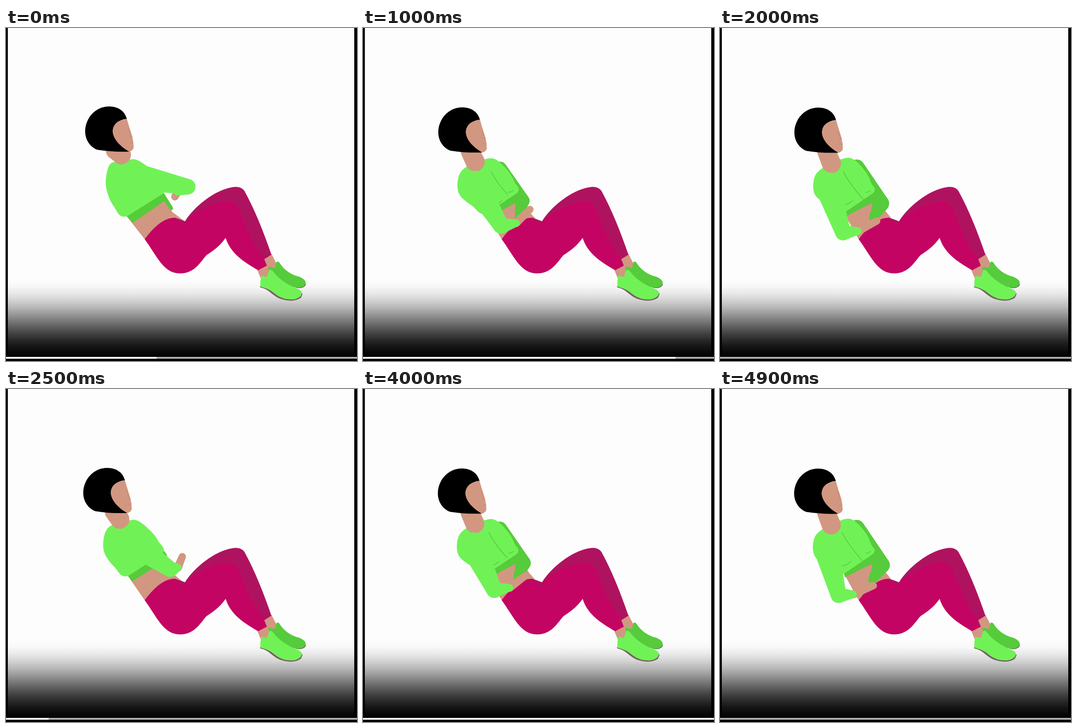
Write an HTML page with a canvas that moves like this. It is 767 px wide and 730 px high and loops after 5000 ms.

```html
<!DOCTYPE html>
<html lang="en">
<head>
<meta charset="utf-8">
<title>Seated twist</title>
<style>
html, body { margin: 0; width: 100%; height: 100%; overflow: hidden; background: #000; }
canvas { display: block; }
</style>
</head>
<body>
<canvas id="stage" width="767" height="730"></canvas>
<script>
const ctx = document.getElementById('stage').getContext('2d');
const LOOP = 5000, STEP = 100;
const LIGHT = '#70f256', DARK = '#56cb3b', SKIN = '#d29781', PINK = '#c30463', PLUM = '#af1360';

const clamp = x => Math.max(0, Math.min(1, x));
const smooth = x => x * x * (3 - 2 * x);
const mix = (a, b, k) => a + (b - a) * k;
const lerp = (a, b, k) => a.map((v, i) => mix(v, b[i], k));
const arc = (a, c, b, k) => lerp(lerp(a, c, k), lerp(c, b, k), k);
const points = s => s.split(' ').map(p => p.split(',').map(Number));
const morph = (a, b, k) => points(a).map((p, i) => lerp(p, points(b)[i], k));

// 0 = turned to the knees, 1 = turned to the viewer
function twistAt(t) {
  const ramp = start => smooth(clamp((t - start) / 1120));
  return ramp(227) - ramp(1850) + ramp(3148);
}

// The playback bar jumps ahead, rests when full, then empties
function barAt(t) {
  const u = (t + 530) % 2900;
  return u < 2000 ? Math.min(767, 93 + 118 * Math.floor(u / 260)) : 0;
}

function shape(d, color) {
  ctx.fillStyle = color;
  ctx.fill(new Path2D(d));
}

function line(d, color, width) {
  ctx.strokeStyle = color;
  ctx.lineWidth = width;
  ctx.lineCap = ctx.lineJoin = 'round';
  ctx.stroke(new Path2D(d));
}

function polygon(pts, color) {
  shape('M' + pts.join('L') + 'Z', color);
}

// Closed smooth curve through the points
function blob(pts, color) {
  const n = pts.length, at = i => pts[(i + n) % n];
  ctx.beginPath();
  ctx.moveTo(...pts[0]);
  for (let i = 0; i < n; i++) {
    const [a, b, c, d] = [at(i - 1), at(i), at(i + 1), at(i + 2)];
    ctx.bezierCurveTo(b[0] + (c[0] - a[0]) / 6, b[1] + (c[1] - a[1]) / 6,
      c[0] - (d[0] - b[0]) / 6, c[1] - (d[1] - b[1]) / 6, ...c);
  }
  ctx.fillStyle = color;
  ctx.fill();
}

// Tapered limb: two round ends joined by their outer tangents
function limb(a, ra, b, rb, color) {
  const dx = b[0] - a[0], dy = b[1] - a[1];
  const dir = Math.atan2(dy, dx), open = Math.acos(clamp((ra - rb) / Math.hypot(dx, dy)));
  ctx.beginPath();
  ctx.arc(...a, ra, dir + open, dir - open);
  ctx.arc(...b, rb, dir - open, dir + open);
  ctx.fillStyle = color;
  ctx.fill();
}

function legs() {
  shape('M563 506L580 495L593 520L586 538L568 530Z', SKIN);
  shape('M549 530L571 519L580 545L572 556L558 552Z', SKIN);
  line('M634 568Q650 571 654 562', '#6d6562', 3);
  shape('M573 523L588 526L591 513Q595 510 598 515C607 530 623 541 640 545Q655 551 655 559Q653 568 642 569Q627 570 600 560L576 540Z', DARK);
  shape('M391 424C410 393 455 355 495 349Q513 346 521 357C543 397 563 447 580 497L564 507L480 450Z', PLUM);
  line('M557 567C575 570 582 584 598 591Q628 601 643 590L646 583', '#75635f', 4);
  shape('M558 543L570 546L575 531Q579 528 584 534C597 552 618 564 638 572Q649 577 646 584Q642 593 627 595Q606 596 591 585C579 574 570 571 556 567Q555 555 558 543Z', LIGHT);
  shape('M303 463C322 438 344 415 370 416Q382 420 391 424C420 401 450 383 482 380Q502 379 511 402C525 440 541 476 564 506L570 521L551 531C518 512 490 493 480 460C466 480 450 490 438 498C424 514 412 538 380 538C344 538 330 500 303 463Z', PINK);
  shape('M366 416Q380 419 391 424L388 434Q378 422 366 416Z', PLUM);
}

function head(s) {
  ctx.save();
  ctx.translate(-11 * s, 2.5 * s);
  shape('M225 210L264 199L269 216L276 238Q279 250 279 263Q276 270 268 271L225 262Z', SKIN);
  line('M268 221L272 236M270 240L276 239M271 252L277 252', '#bd8674', 1);
  shape('M264 199C259 180 243 172 225 172C195 172 173 198 173 227C173 246 185 262 200 267Q231 272 269 271C250 260 233 243 233 225Q235 203 264 199Z', '#000');
  ctx.restore();
}

function folds(s) {
  const [x, y] = lerp([325, 316], [267, 315], s), [fx, fy] = lerp([330, 320], [312, 378], s);
  ctx.globalAlpha = clamp((s - .55) * 5);
  line(`M${x} ${y}Q${x + 12} ${y + 25} ${fx} ${fy}`, DARK, 1.6);
  line(`M${345 - 80 * s} 388q12 -1 21 -10M318 360q7 0 11 -4`, DARK, 1.5);
  ctx.globalAlpha = 1;
}

function body(s) {
  polygon(morph('264,413 303,463 335,446 391,424 363,403 345,365',
    '271,405 303,463 335,446 373,416 363,403 338,368', s), SKIN);
  legs();

  const farElbow = lerp([335, 355], [353, 386], s), farWidth = mix(5, 18, s);
  limb(lerp([300, 320], [299, 304], s), mix(8, 17, s), farElbow, farWidth, DARK);
  limb(farElbow, farWidth, lerp([361, 395], [333, 418], s), mix(4, 9, s), DARK);

  blob(morph('229,297 219,325 220,355 235,390 264,413 345,362 335,330 312,306 282,288 255,293',
    '219,311 204,335 208,368 240,390 271,405 334,362 330,340 318,315 292,288 267,287', s), LIGHT);
  polygon(morph('264,413 345,362 351,376 277,427', '271,405 334,362 342,378 273,413', s), DARK);
  folds(s);
  limb(lerp([238, 268], [232, 270], s), 20, lerp([252, 278], [243, 298], s), 21, SKIN);

  const elbow = arc([397, 348], [359, 416], [259, 452], s);
  const wrist = arc([375, 359], [402, 400], [291, 450], s);
  limb(wrist, 9, arc([369, 370], [414, 346], [335, 431], s), 8, SKIN);
  limb(lerp([295, 328], [231, 345], s), 28, elbow, 17, LIGHT);
  limb(elbow, 17, wrist, 8, LIGHT);
}

const shade = ctx.createLinearGradient(0, 550, 0, 730);
for (let i = 0; i <= 12; i++) shade.addColorStop(i / 12, `rgba(0,0,0,${smooth(i / 12)})`);

function box(color, x, y, w, h) {
  ctx.fillStyle = color;
  ctx.fillRect(x, y, w, h);
}

function draw(now) {
  const t = Math.floor(now % LOOP / STEP) * STEP, s = twistAt(t);
  box('#000', 0, 0, 767, 730);
  box('#fdfdfd', 4, 0, 757, 721);
  box(shade, 4, 550, 757, 171);
  body(s);
  head(s);
  box('#b0b0b0', 0, 721, 767, 4);
  box('#fff', 0, 721, barAt(t), 4);
}

const start = performance.now();
(function tick() {
  draw(performance.now() - start);
  requestAnimationFrame(tick);
})();
</script>
</body>
</html>
```
